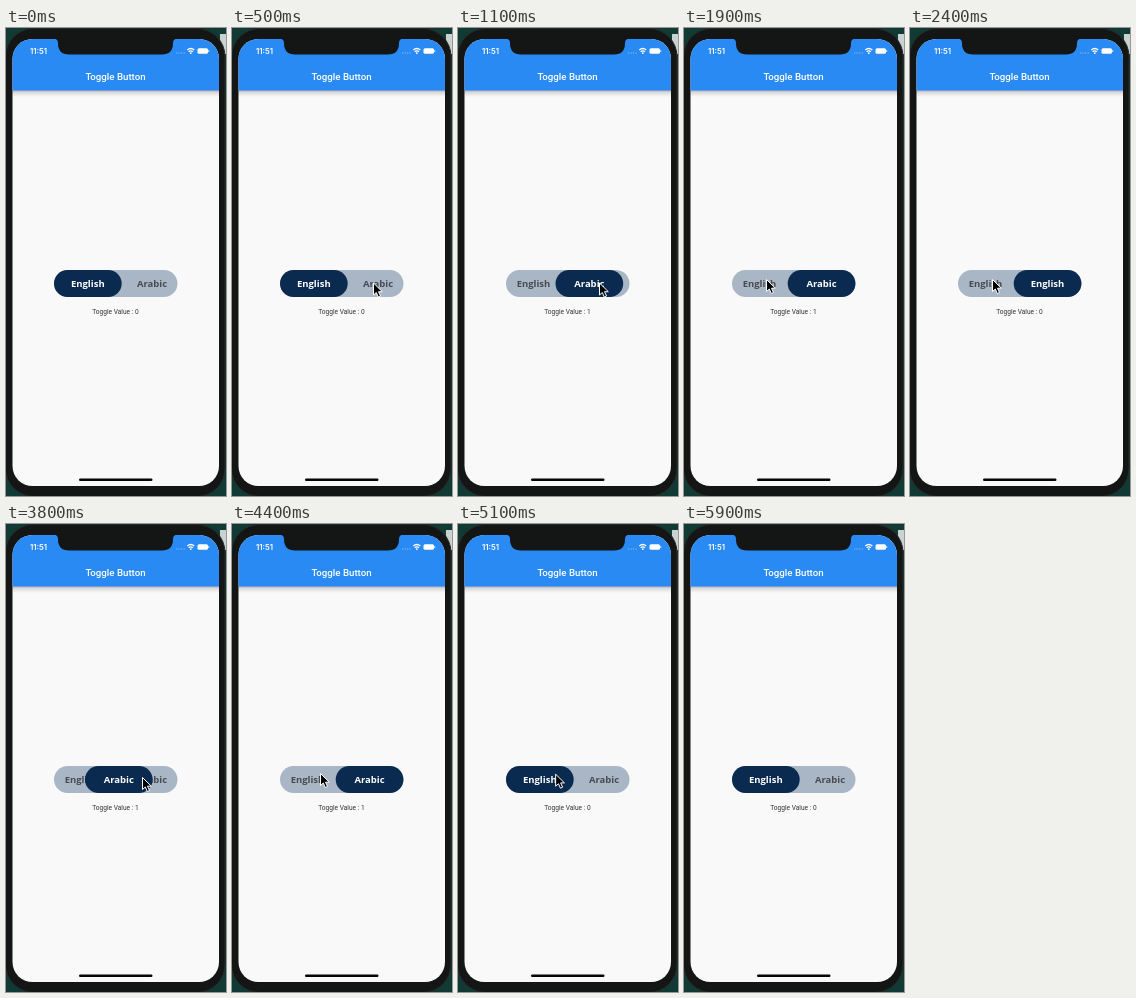
Animation, 220 px wide and 468 px high, one loop 6 s. Source, as an HTML page:

```html
<!DOCTYPE html>
<html lang="en">
<head>
<meta charset="utf-8">
<title>Toggle Button</title>
<style>
  html, body { margin: 0; width: 100%; height: 100%; overflow: hidden; background: #103a33; }
  svg { display: block; width: 220px; height: 468px; }
  text { text-anchor: middle; font-family: Roboto, sans-serif; }
  .time { font: 600 7.8px Inter, sans-serif; fill: #fff; }
  .title { font-size: 9.7px; font-weight: 500; fill: #fff; }
  .label { font: 700 9.5px "Open Sans", sans-serif; fill: #484b50; }
  .thumb .label { fill: #fff; }
  .value { font-size: 6.6px; fill: #333; }
</style>
</head>
<body>
<svg viewBox="0 0 220 468">
  <defs>
    <linearGradient id="shade" x2="0" y2="1">
      <stop offset="0" stop-color="#000" stop-opacity=".3"/>
      <stop offset=".4" stop-color="#000" stop-opacity=".11"/>
      <stop offset="1" stop-color="#000" stop-opacity="0"/>
    </linearGradient>
    <clipPath id="screen"><rect x="6.5" y="11" width="206.5" height="447" rx="20"/></clipPath>
  </defs>

  <!-- Phone body -->
  <rect width="220" height="468" fill="#103a33"/>
  <path d="M214 6h6v20h-6z" fill="#c9d2d0"/>
  <rect x="-.5" y=".5" width="219.5" height="468" rx="28" fill="#141515" stroke="#292b2b"/>

  <g clip-path="url(#screen)">
    <rect y="11" width="220" height="447" fill="#f9f9f9"/>
    <rect y="62" width="220" height="7" fill="url(#shade)"/>
    <rect y="11" width="220" height="51.5" fill="#2a8af3"/>
  </g>
  <path d="M48 10.5q4 .5 4 4.500q0 11.500 11 11.500h93q11 0 11-11.500q0-4 4-4.500z" fill="#141515"/>

  <!-- Status bar -->
  <text class="time" x="32.500" y="26">11:51</text>
  <path d="M170 25h9" stroke="#fff" stroke-opacity=".45" stroke-dasharray="1.200 1.300"/>
  <g fill="none" stroke="#fff" stroke-width="1.300">
    <path d="M181.300 22q3.500-3 7 0M182.700 23.700q2.100-1.700 4.200 0"/>
  </g>
  <circle cx="184.800" cy="25.200" r=".9" fill="#fff"/>
  <rect x="191.500" y="20.300" width="10.500" height="5.400" rx="1.500" fill="#fff"/>
  <path d="M202.700 22v2" stroke="#fff" stroke-width=".8"/>

  <text class="title" x="109.500" y="52">Toggle Button</text>

  <!-- Toggle -->
  <rect x="48" y="242" width="123.500" height="27" rx="13.500" fill="#a9b6c5"/>
  <text class="label" x="75.500" y="259.300">English</text>
  <text class="label" x="146" y="259.300">Arabic</text>
  <g class="thumb" id="thumb">
    <rect x="48" y="242" width="67.700" height="27" rx="13.500" fill="#0b2a50"/>
    <text class="label" id="choice" x="81.800" y="259.300">English</text>
  </g>
  <text class="value" id="value" x="109.400" y="285.500">Toggle Value : 0</text>

  <rect x="73" y="450.500" width="73.500" height="2.500" rx="1.250" fill="#050505"/>

  <path id="cursor" d="M0 0V12L2.800 9.500L4.800 14L7 13L5 8.700H8.800Z"
        fill="#000" stroke="#fff" stroke-width="1"/>
</svg>

<script>
  const LOOP = 6000, STEP = 100, SLIDE = 300, TRAVEL = 55.7;
  const find = id => document.getElementById(id);
  const thumb = find("thumb"), choice = find("choice"), value = find("value"), cursor = find("cursor");

  // [time, selected side]
  const taps = [[-1000, 0], [900, 1], [2400, 0], [3700, 1], [4600, 0]];
  // [time, x, y]
  const path = [
    [100, 169, 278], [500, 141.500, 255], [1500, 141.500, 255], [1900, 82.500, 251.500],
    [3100, 82.500, 251.500], [3500, 136.500, 253.500], [4000, 136.500, 253.500],
    [4400, 88.500, 249.500], [5000, 88.500, 249.500], [5400, 147, 254], [5700, 134, 253]
  ];

  const mix = (a, b, k) => a + (b - a) * k;
  const smooth = k => k * k * (3 - 2 * k);
  const decelerate = k => 1 - (1 - k) ** 2;

  function drawToggle(t) {
    const [start, side] = taps.filter(tap => tap[0] <= t).pop();
    const k = decelerate(Math.min(1, (t - start) / SLIDE));
    thumb.setAttribute("transform", `translate(${TRAVEL * mix(1 - side, side, k)} 0)`);
    choice.textContent = side ? "Arabic" : "English";
    value.textContent = "Toggle Value : " + side;
  }

  function drawCursor(t) {
    const i = path.findIndex(p => p[0] >= t);
    const visible = i >= 0 && t >= path[0][0];
    cursor.style.display = visible ? "" : "none";
    if (!visible) return;
    const b = path[i], a = path[Math.max(0, i - 1)];
    const k = a === b ? 0 : smooth((t - a[0]) / (b[0] - a[0]));
    cursor.setAttribute("transform", `translate(${mix(a[1], b[1], k)} ${mix(a[2], b[2], k)})`);
  }

  const origin = performance.now();
  function draw() {
    const elapsed = (performance.now() - origin) % LOOP;
    const t = Math.floor(elapsed / STEP) * STEP;
    drawToggle(t);
    drawCursor(t);
    requestAnimationFrame(draw);
  }
  draw();
</script>
</body>
</html>
```
